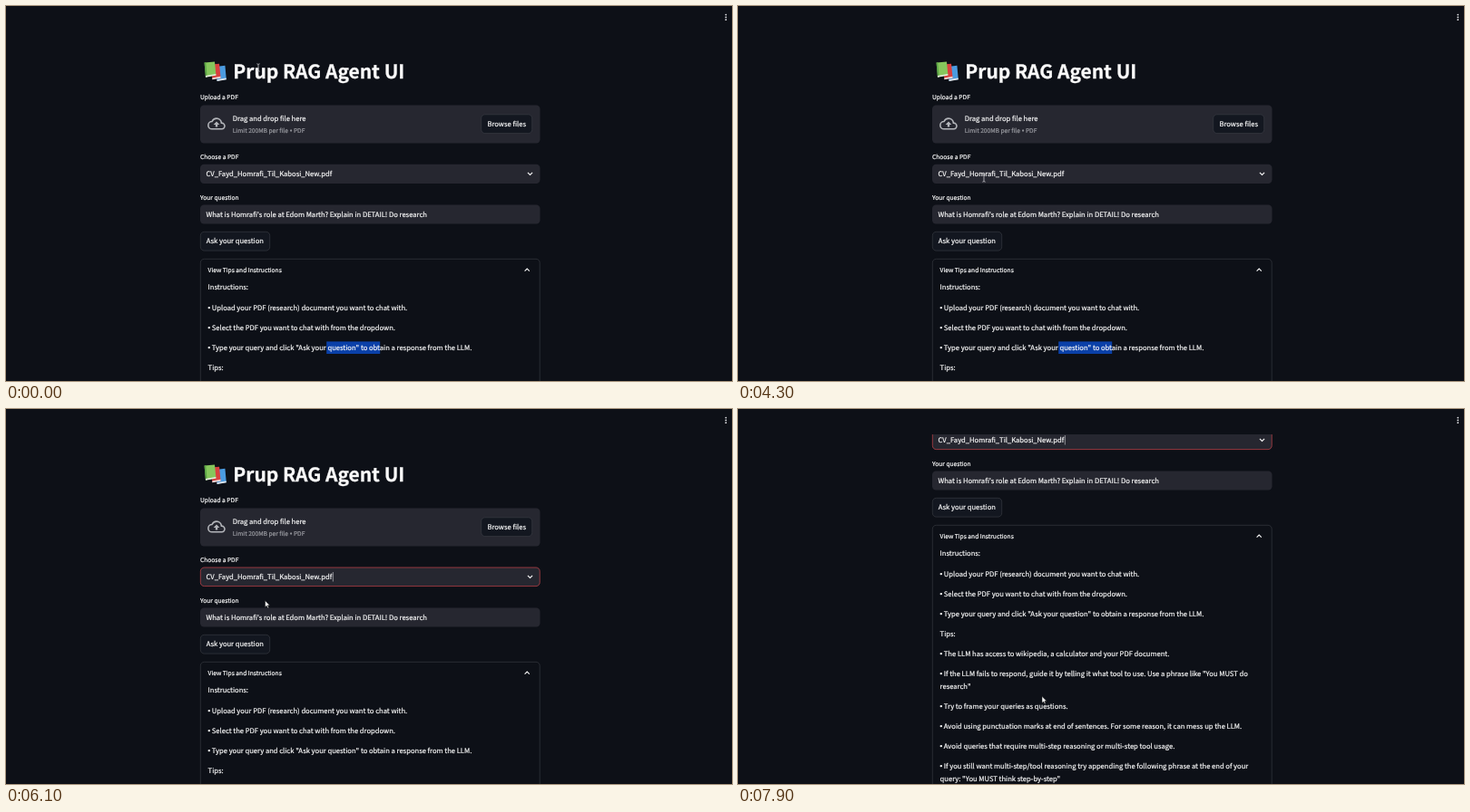
An HTML page that plays this animation: 800x414 px, repeating every 8 s.

```html
<!DOCTYPE html>
<html lang="en">
<head>
<meta charset="utf-8">
<title>RAG Agent UI</title>
<style>
  html, body { margin: 0; width: 100%; height: 100%; overflow: hidden; background: #0d1017; }
  svg { display: block; width: 100%; height: 100%; }
  text {
    font-family: "Noto Sans CJK SC", "Noto Sans CJK JP", "Open Sans", sans-serif;
    font-size: 7.62px; white-space: pre; text-rendering: geometricPrecision;
    color: #fafafa; fill: currentColor; stroke: currentColor; stroke-width: .2;
  }
  .small { font-size: 6.67px; }
  .dim { color: #9a9ba1; }
  .title { font-size: 20.95px; font-weight: 700; stroke-width: .3; }
  .mid { text-anchor: middle; }
  .dot { font-weight: 700; stroke-width: .5; }
  .field { fill: #262730; }
  .button { fill: #131720; stroke: #3d4047; stroke-width: .6; }
  .line { fill: none; stroke: #fafafa; stroke-width: 1.1; }
</style>
</head>
<body>
<svg viewBox="0 0 800 414" preserveAspectRatio="none">
  <g id="page"></g>
  <rect width="800" height="28" fill="#0d1017"/>
  <g fill="#e4e5e8">
    <circle cx="793.3" cy="9.6" r=".9"/><circle cx="793.3" cy="12.4" r=".9"/><circle cx="793.3" cy="15.2" r=".9"/>
  </g>
  <g id="mouse" stroke-linejoin="round">
    <path d="M0 0V7.2L1.7 5.7L2.9 8.3L4 7.8L2.9 5.3H5.1Z" fill="#fff" stroke="#111" stroke-width=".5"/>
    <path d="M-1.6 -4.2Q0 -4.2 0 -3.2Q0 -4.2 1.6 -4.2M0 -3.2V3.2M-1.6 4.2Q0 4.2 0 3.2Q0 4.2 1.6 4.2" fill="none" stroke="#c4c5c9" stroke-width=".8"/>
    <path d="M-.8 -3.4Q0 -4.4 .8 -3.4V-.4L3.6 .4Q4.4 .8 4.2 2L3.4 5.4H-.8L-3.2 2Q-3.2 .8 -2 1.2L-.8 2Z" fill="#fff" stroke="#111" stroke-width=".5"/>
  </g>
</svg>
<script>
const LOOP = 8000, STEP = 100;
const OPEN = 4500, CLOSE = 5700;
const SCROLL = { from: 6300, to: 6600, by: 151 };
const ARROW = 0, BEAM = 1, HAND = 2;

// time, x, y, pointer shape
const MOVES = [
  [0, 278, 68, BEAM], [400, 235, 72, BEAM], [800, 445, 73, BEAM],
  [1100, 400, 70, BEAM], [1500, 230, 66, BEAM], [1800, 290, 74, BEAM],
  [2100, 245, 122, ARROW], [2600, 318.5, 130, ARROW], [3000, 505, 132, ARROW],
  [3400, 300, 138, ARROW], [3700, 245, 165, ARROW], [4000, 262, 187, BEAM],
  [4300, 271, 190, BEAM], [4500, 272, 190, BEAM], [4700, 274, 204, HAND],
  [4950, 290, 228, HAND], [5300, 279.5, 204, HAND], [5700, 281, 206, ARROW],
  [6100, 285.5, 211.5, ARROW], [6300, 290, 222, ARROW], [6700, 305.3, 245, ARROW],
  [7000, 320, 285, ARROW], [7300, 430, 345, ARROW], [7600, 240, 398, ARROW],
  [7900, 335, 317.3, ARROW], [8000, 335, 317.3, ARROW]
];

const LEFT = 214, WIDTH = 374.5;
const FILE = "CV_Fayd_Homrafi_Til_Kabosi_New.pdf";
const OTHER = "Sales_Tax_CRM_Overview_Notion_11_7_25.pdf";

// Expander lines; "*" starts a bullet, ">" continues one
const NOTES = [
  "Instructions:",
  "*Upload your PDF (research) document you want to chat with.",
  "*Select the PDF you want to chat with from the dropdown.",
  "*Type your query and click \"Ask your question\" to obtain a response from the LLM.",
  "Tips:",
  "*The LLM has access to wikipedia, a calculator and your PDF document.",
  "*If the LLM fails to respond, guide it by telling it what tool to use. Use a phrase like \"You MUST do",
  ">research\"",
  "*Try to frame your queries as questions.",
  "*Avoid using punctuation marks at end of sentences. For some reason, it can mess up the LLM.",
  "*Avoid queries that require multi-step reasoning or multi-step tool usage.",
  "*If you still want multi-step/tool reasoning try appending the following phrase at the end of your",
  ">query: \"You MUST think step-by-step\""
];

const text = (x, y, s, cls = "") => `<text x="${x}" y="${y}" class="${cls}">${s}</text>`;
const box = (x, y, w, h, cls) =>
  `<rect x="${x}" y="${y}" width="${w}" height="${h}" rx="4.2" class="${cls}"/>`;
const chevron = (x, y, d) => `<path class="line" d="M${x - 2.6} ${y - d}L${x} ${y + d}L${x + 2.6} ${y - d}"/>`;

function notes() {
  let y = 313.4 - 22.1;
  return NOTES.map(s => {
    y += s[0] === ">" ? 13.6 : 22.1;
    if (s[0] === "*") return text(223.8, y, "•", "mid dot") + text(226.8, y, s.slice(1));
    return text(222.6, y, s.replace(">", ""));
  }).join("");
}

const books = `
  <path d="M231 67L241.4 65.8L242.8 81L232.6 82.8Z" fill="#4b9be0"/>
  <path d="M232.4 81.2L242.6 79.6L242.8 81.2L232.6 83Z" fill="#e4e8ec"/>
  <path d="M226 64.6L235 63.8L236.6 79.4L227.4 81Z" fill="#d8403f"/>
  <path d="M227.2 79.4L236.5 77.8L236.6 79.4L227.4 81.2Z" fill="#e9e2e0"/>
  <path d="M218.6 62.4L230 61.4L231.4 76.4L220 78.4Z" fill="#86c65c"/>
  <path d="M218.6 62.4L220.2 62.2L221.6 78.1L220 78.4Z" fill="#5aa445"/>
  <path d="M219.9 77L231.3 75L231.4 76.6L220 78.8Z" fill="#e6ebe0"/>`;

const cloud = `<g transform="translate(222 120) scale(.8333)" fill="none" stroke="#b4b6bb" stroke-width="1.9">
  <path d="M18.5 11A6.6 6.6 0 0 0 12 5C9.4 5 7.1 6.5 6 9A5 5 0 0 0 6 19H19A4 4 0 0 0 18.5 11Z"/>
  <path d="M8 13.2H10.6V16.2H13.4V13.2H16L12 9Z" fill="#b4b6bb" stroke="none"/></g>`;

const $ = id => document.getElementById(id);

$("page").innerHTML =
  books + text(250.3, 80, "Prup RAG Agent UI", "title") +
  text(LEFT, 103.4, "Upload a PDF", "small") +
  box(LEFT, 109.5, WIDTH, 42, "field") + cloud +
  text(249.7, 127.3, "Drag and drop file here") +
  text(249.7, 140.3, "Limit 200MB per file", "small dim") +
  text(314.2, 140.3, "•", "small dim mid dot") + text(316.9, 140.3, "PDF", "small dim") +
  box(523.7, 119.8, 56, 20.8, "button") + text(551.7, 132.8, "Browse files", "mid") +
  text(LEFT, 168.9, "Choose a PDF", "small") +
  box(LEFT, 174.7, WIDTH, 21.2, "field") +
  `<rect id="focus" x="214.3" y="175" width="373.9" height="20.6" rx="4.2" fill="none" stroke="#c43f45" stroke-width=".7"/>` +
  text(220.5, 187.9, FILE) + chevron(577.5, 185.2, 1.3) +
  `<rect id="caret" x="359.9" y="180" width=".6" height="10.5" fill="#d5d6da"/>` +
  text(LEFT, 213.5, "Your question", "small") +
  box(LEFT, 219.4, WIDTH, 21.2, "field") +
  text(220.5, 232.6, "What is Homrafi's role at Edom Marth? Explain in DETAIL! Do research") +
  box(LEFT + .3, 249.3, 76.4, 20.8, "button") + text(252.3, 262.4, "Ask your question", "mid") +
  `<rect x="214.3" y="279.3" width="373.9" height="420" rx="4.2" fill="none" stroke="#3d4047" stroke-width=".6"/>` +
  text(222.6, 294.2, "View Tips and Instructions", "small") + chevron(574.2, 291.3, -1.3) +
  `<rect id="marked" x="353.2" y="370.4" width="59" height="13.6" fill="#0a40a8"/>` +
  notes() +
  `<g id="menu">${box(LEFT, 197, WIDTH, 43.6, "field")}
    <rect id="hover" x="214" width="374.5" height="21" fill="#0f1219"/>
    ${text(222, 209.3, FILE)}${text(222, 230.5, OTHER)}</g>`;

const show = (el, on) => el.setAttribute("visibility", on ? "visible" : "hidden");
const ease = k => k * k * (3 - 2 * k);
const clamp = k => Math.max(0, Math.min(1, k));

function pointer(t) {
  const i = MOVES.findIndex(m => m[0] > t);
  const a = MOVES[i - 1], b = MOVES[i];
  const k = ease((t - a[0]) / (b[0] - a[0]));
  return { x: a[1] + (b[1] - a[1]) * k, y: a[2] + (b[2] - a[2]) * k, shape: a[3] };
}

function draw(t) {
  const p = pointer(t);
  const focused = t >= OPEN, open = focused && t < CLOSE;
  const scroll = SCROLL.by * ease(clamp((t - SCROLL.from) / (SCROLL.to - SCROLL.from)));

  $("page").setAttribute("transform", `translate(0 ${-scroll})`);
  $("mouse").setAttribute("transform", `translate(${p.x} ${p.y})`);
  [...$("mouse").children].forEach((el, i) => show(el, i === p.shape));

  show($("marked"), !focused);
  show($("focus"), focused);
  show($("caret"), focused && (t + 200) % 1000 < 500);
  $("menu").setAttribute("display", open ? "inline" : "none");
  $("hover").setAttribute("y", p.y > 217.5 ? 217.5 : 196.5);
}

const start = performance.now();
function tick() {
  const t = (performance.now() - start) % LOOP;
  draw(Math.floor(t / STEP) * STEP);
  requestAnimationFrame(tick);
}
tick();
</script>
</body>
</html>
```
